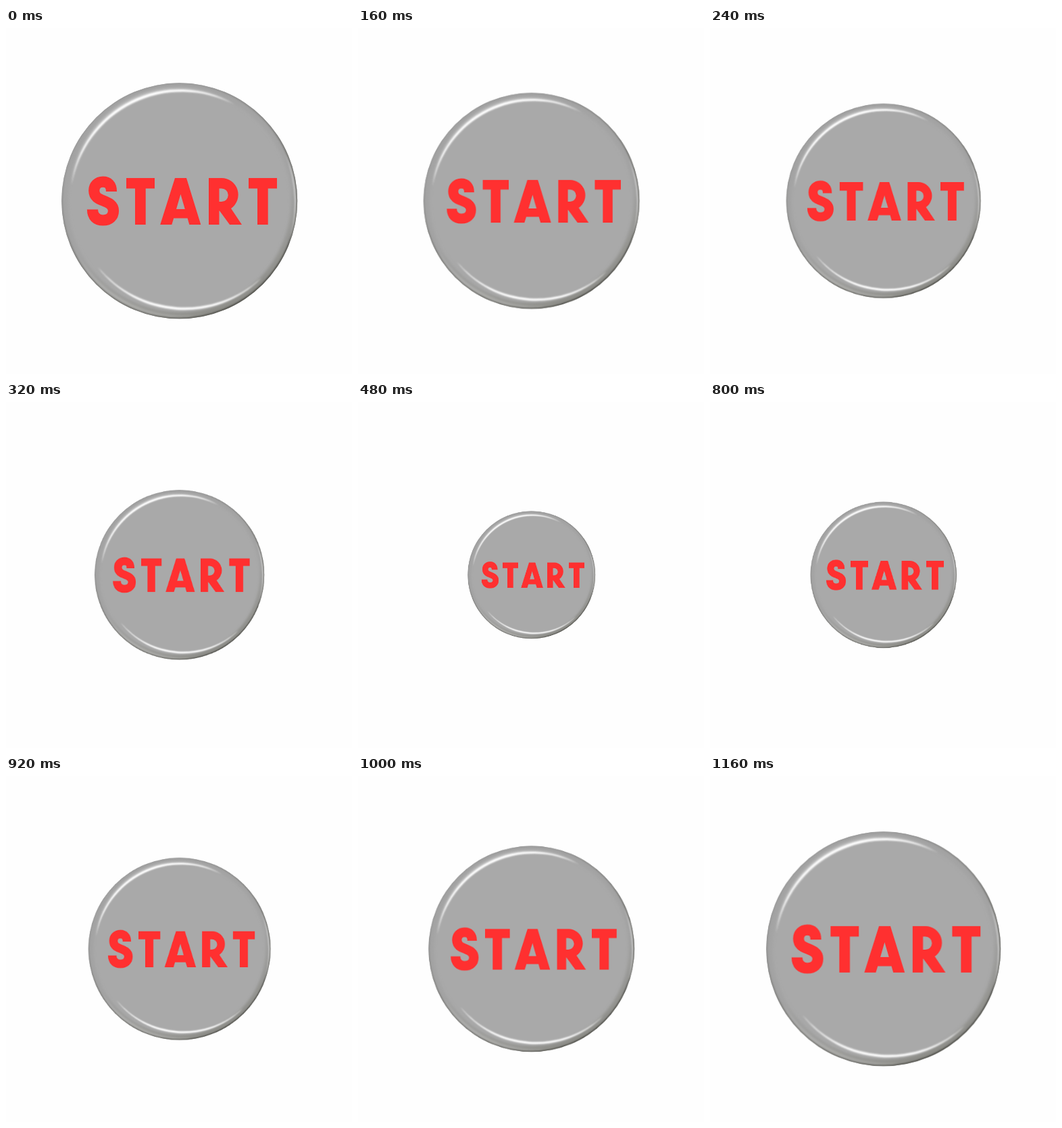
These frames come from a looping animation (512 px wide and 512 px high, 1200 ms). An HTML page:

```html
<!DOCTYPE html>
<html lang="en">
<head>
<meta charset="utf-8">
<title>Start button</title>
<style>
  html, body { margin: 0; width: 100%; height: 100%; overflow: hidden; background: #fefefe; }
  svg { display: block; width: 100%; height: 100%; }
  #button { transform-origin: 256.7px 255.8px; }
</style>
</head>
<body>
<svg viewBox="0 0 512 512" role="img" aria-label="START">
  <defs>
    <linearGradient id="rim" x1=".25" y1="0" x2=".6" y2="1">
      <stop offset="0" stop-color="#a4a4a4"/>
      <stop offset=".6" stop-color="#a3a3a3"/>
      <stop offset="1" stop-color="#8d8d88"/>
    </linearGradient>
    <linearGradient id="edge" x1=".2" y1=".1" x2=".75" y2=".95">
      <stop offset=".1" stop-color="#8c8c8c" stop-opacity=".4"/>
      <stop offset=".5" stop-color="#6e6e6a" stop-opacity=".8"/>
      <stop offset="1" stop-color="#4d4d47"/>
    </linearGradient>
    <filter id="soft" x="-10%" y="-10%" width="120%" height="120%">
      <feGaussianBlur stdDeviation=".9"/>
    </filter>
    <filter id="haze" x="-10%" y="-20%" width="120%" height="140%">
      <feGaussianBlur stdDeviation="2.2"/>
    </filter>
    <clipPath id="disc"><circle cx="256.7" cy="255.8" r="174.5"/></clipPath>
  </defs>

  <g id="button">
    <g clip-path="url(#disc)">
      <circle cx="256.7" cy="255.8" r="175" fill="#a9a9a9"/>
      <g fill="none">
        <circle cx="256.7" cy="255.8" r="170" stroke="url(#rim)" stroke-width="10" filter="url(#haze)"/>
        <circle cx="256.7" cy="255.8" r="174" stroke="url(#edge)" stroke-width="3" filter="url(#soft)"/>
      </g>
      <g fill="#fff">
        <!-- upper left shine -->
        <path d="M97 232A158 158 0 0 1 338 113A165 165 0 0 0 97 232Z" opacity=".35" filter="url(#haze)"/>
        <path d="M97 232A161 161 0 0 1 338 113A166.5 166.5 0 0 0 97 232Z" filter="url(#soft)"/>
        <!-- lower shine -->
        <path d="M136 354A161 161 0 0 0 378 370A169 169 0 0 1 136 354Z" filter="url(#soft)"/>
        <!-- reflected light on the rim -->
        <path d="M104 335A171 171 0 0 0 300 423A186 186 0 0 1 104 335Z" opacity=".35" filter="url(#haze)"/>
        <path d="M413 185A171.5 171.5 0 0 1 418 320A204 204 0 0 0 413 185Z" opacity=".5" filter="url(#soft)"/>
      </g>
    </g>

    <g id="label" fill="#ff3030">
      <path fill="none" stroke="#ff3030" stroke-width="16.2"
        d="M156 242C156 232 151 227.6 143.3 227.6S130.3 233 130.3 240.5C130.3 250 137 252.8 144 255.6C152 258.8 159 262 159 270.5C159 279 153 284.5 143.5 284.5S128 279 128 268.5"/>
      <path id="tee" d="M178 222H220V237.5H206.7V291H191V237.5H178Z"/>
      <use href="#tee" x="181"/>
      <path fill-rule="evenodd"
        d="M250 222H267L288.3 291H271.3L268.6 281.5H248.2L245.3 291H228.2ZM258.4 246L252 268H264.8Z"/>
      <path fill-rule="evenodd"
        d="M300 222H319A24.7 24.7 0 0 1 333 267L349 291H331L316 270.5H315.5V291H300ZM315.5 237.5V257H319A9.75 9.75 0 0 0 319 237.5Z"/>
    </g>
  </g>
</svg>
<script>
  const LOOP = 1200, STEPS = 30;
  const MAX = 349, MID = 260.5, SWING = 88.5;

  // Diameter follows a cosine, held for each step.
  const frames = Array.from({ length: STEPS + 1 }, (_, i) => {
    const size = MID + SWING * Math.cos(2 * Math.PI * i / STEPS);
    return { transform: `scale(${size / MAX})`, offset: i / STEPS, easing: 'steps(1, end)' };
  });

  const pulse = document.getElementById('button')
    .animate(frames, { duration: LOOP, iterations: Infinity });
  pulse.startTime = 0;
</script>
</body>
</html>
```
